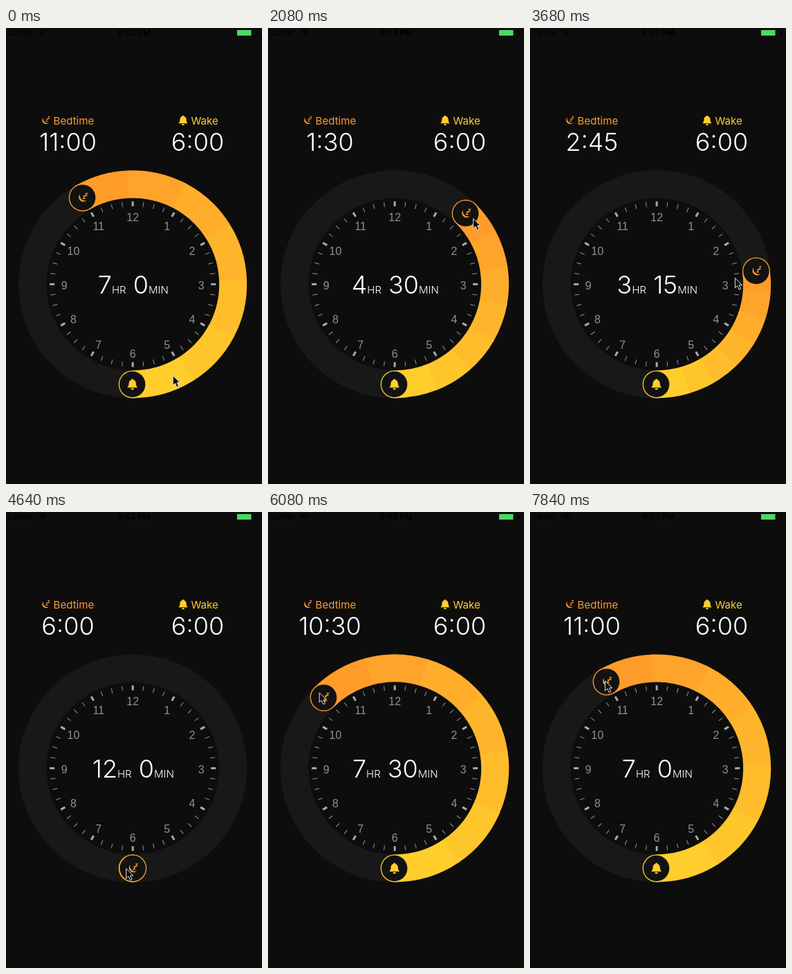
An HTML page for the animation above (8000 ms loop, 370x661 px).

```html
<!DOCTYPE html>
<html lang="en">
<head>
<meta charset="utf-8">
<title>Bedtime dial</title>
<style>
  html, body { margin: 0; width: 100%; height: 100%; overflow: hidden; background: #0d0d0d; }
  svg { display: block; width: 370px; height: 661px; }
  text { font-family: Inter, "Open Sans", sans-serif; }
  .bar { font-size: 11.6px; fill: #000; }
  .label { font-size: 15.1px; }
  .time { font-size: 36px; font-weight: 300; fill: #fff; text-anchor: middle; }
  .unit { font-size: 15px; }
  .num { font: 16px "Liberation Sans", Arial, sans-serif; fill: #919191; text-anchor: middle; }
</style>
</head>
<body>
<svg viewBox="0 0 370 661">
  <defs>
    <g id="moon">
      <path d="M-3.6-5.2A6.5 6.5 0 1 0 5.9 4A7.4 7.4 0 0 1-3.6-5.2Z"/>
      <path d="M.7-2.2h3.2L.7 1.5h3.2M3.9-6.4h3L3.9-3h3" fill="none" stroke="currentColor" stroke-width="1.1"/>
    </g>
    <path id="bell" d="M-1.5-6.6a1.5 1.5 0 0 1 3 0C4-5.8 5-4 5.1-1.5C5.2 1.5 6 3 7.5 4.7H-7.5C-6 3-5.2 1.5-5.1-1.5C-5-4-4-5.8-1.5-6.6ZM-2.3 5.7H2.3A2.3 2.3 0 0 1-2.3 5.7Z"/>
  </defs>
  <rect width="370" height="661" fill="#0d0d0d"/>

  <text class="bar" x="1.5" y="11">Carrier</text>
  <g fill="none" stroke="#000" stroke-width="1.5">
    <path d="M47 5.6a7.5 7.5 0 0 1 11 0M49 7.8a4.9 4.9 0 0 1 7 0"/>
  </g>
  <circle cx="52.5" cy="9.8" r="1.3"/>
  <text class="bar" x="185" y="11" text-anchor="middle" font-weight="600">9:03 PM</text>
  <rect x="334" y="3" width="20.5" height="8" fill="#4cd964"/>
  <rect x="362.5" y="5" width="2" height="4"/>

  <g fill="#ff9c2a" color="#ff9c2a">
    <use href="#moon" transform="translate(57 134) scale(.87)"/>
    <text class="label" x="68.5" y="139.5">Bedtime</text>
  </g>
  <g fill="#ffce2e">
    <use href="#bell" transform="translate(256 134) scale(.9)"/>
    <text class="label" x="267.5" y="139.5">Wake</text>
  </g>
  <text class="time" id="bed" x="89.5" y="178"></text>
  <text class="time" x="277" y="178">6:00</text>

  <circle cx="183.2" cy="371.4" r="145" fill="none" stroke="#181818" stroke-width="40.5"/>
  <g id="face"></g>
  <g id="arc" fill="none" stroke-width="40"></g>
  <g transform="translate(182.7 516.5)" fill="#ffce2e">
    <circle r="20"/>
    <circle r="18.7" fill="#121212"/>
    <use href="#bell"/>
  </g>
  <g id="knob" fill="#ff9c2a" color="#ff9c2a">
    <circle r="20"/>
    <circle r="18.7" fill="#121212"/>
    <use href="#moon"/>
  </g>
  <text class="time" x="183.8" y="384.5"><tspan id="hr"></tspan><tspan class="unit">HR</tspan><tspan id="min"></tspan><tspan class="unit">MIN</tspan></text>
  <path id="cursor" d="M0 0V14.2L3.3 11.2L5.7 16.8L8.3 15.7L5.9 10.2H10.2Z" fill="#0a0a0a" stroke="#e4e4e4" stroke-width="1"/>
</svg>
<script>
  const NS = "http://www.w3.org/2000/svg";
  const CX = 183.2, CY = 371.4, R = 145;
  const LOOP = 8000, STEP = 160, WAKE = 360, PARTS = 7;
  const $ = id => document.getElementById(id);

  // [ms, bedtime in minutes after twelve]
  const dragKeys = [
    [0, -60], [480, -60], [800, -20], [1280, 35], [1760, 110], [2080, 90],
    [2560, 5], [2880, -20], [3040, -10], [3360, 80], [3680, 165], [4160, 265],
    [4640, 360], [5120, 455], [5600, 570], [6080, 630], [6720, 640],
    [7360, 660], [8000, 660]
  ];
  // [ms, pointer offset from the knob, x and y]
  const pointerKeys = [
    [0, 130.5, 258], [480, 4, 4], [1280, 13.5, 11], [2880, 8.5, 4],
    [3680, -30.5, 10], [4640, -9.5, 0.5], [6080, -6.5, -7],
    [7360, 0, 1], [7520, 0, 1], [7680, -1, 0], [7840, -2, -1], [8000, -2, -1]
  ];

  function sample(keys, t, col = 1) {
    let i = 1;
    while (i < keys.length - 1 && keys[i][0] < t) i++;
    const a = keys[i - 1], b = keys[i];
    return a[col] + (b[col] - a[col]) * (t - a[0]) / (b[0] - a[0]);
  }

  function polar(deg, r, cy = CY) {
    const a = deg * Math.PI / 180;
    return [CX + r * Math.sin(a), cy - r * Math.cos(a)];
  }

  function add(parent, tag, attrs) {
    const el = document.createElementNS(NS, tag);
    for (const k in attrs) el.setAttribute(k, attrs[k]);
    return parent.appendChild(el);
  }

  function buildFace() {
    for (let i = 0; i < 48; i++) {
      const major = i % 4 === 0;
      const [x1, y1] = polar(i * 7.5, 113), [x2, y2] = polar(i * 7.5, 120);
      add($("face"), "line", {
        x1, y1, x2, y2,
        stroke: major ? "#aaa" : "#888",
        "stroke-width": major ? 3 : 1.1
      });
    }
    for (let h = 1; h <= 12; h++) {
      const [x, y] = polar(h * 30, 99, 373);
      add($("face"), "text", { class: "num", x, y: y + 5.8 }).textContent = h;
    }
  }

  buildFace();
  const parts = Array.from({ length: PARTS }, (_, i) => {
    const k = i / (PARTS - 1);
    return add($("arc"), "path", { stroke: `rgb(255,${156 + 50 * k},${41 + 4 * k})` });
  });

  function drawArc(start, span) {
    $("arc").style.display = span ? "" : "none";
    const edge = i => start + span * i / PARTS - (i > 0 && i < PARTS ? 2.5 : 0);
    parts.forEach((p, i) => {
      const end = edge(i + 1) + (i < PARTS - 1 ? Math.min(0.4, span / 20) : 0);
      p.setAttribute("d", `M${polar(edge(i), R)}A${R} ${R} 0 0 1 ${polar(end, R)}`);
    });
  }

  function render(ms) {
    const t = Math.floor(ms / STEP) * STEP;
    const m = Math.round(sample(dragKeys, t) / 5) * 5;
    const clock = (m + 720) % 720;
    const span = (WAKE - clock + 720) % 720;
    const [x, y] = polar(m / 2, R);

    $("bed").textContent = Math.floor(clock / 60) + ":" + String(clock % 60).padStart(2, "0");
    $("hr").textContent = Math.floor((span || 720) / 60);
    $("min").textContent = "\u00a0" + span % 60;
    drawArc(clock / 2, span / 2);
    $("knob").setAttribute("transform", `translate(${x} ${y})`);
    const px = x + sample(pointerKeys, t, 1), py = y + sample(pointerKeys, t, 2);
    $("cursor").setAttribute("transform", `translate(${px} ${py})`);
  }

  const origin = performance.now();
  function tick() {
    render((performance.now() - origin) % LOOP);
    requestAnimationFrame(tick);
  }
  tick();
</script>
</body>
</html>
```
